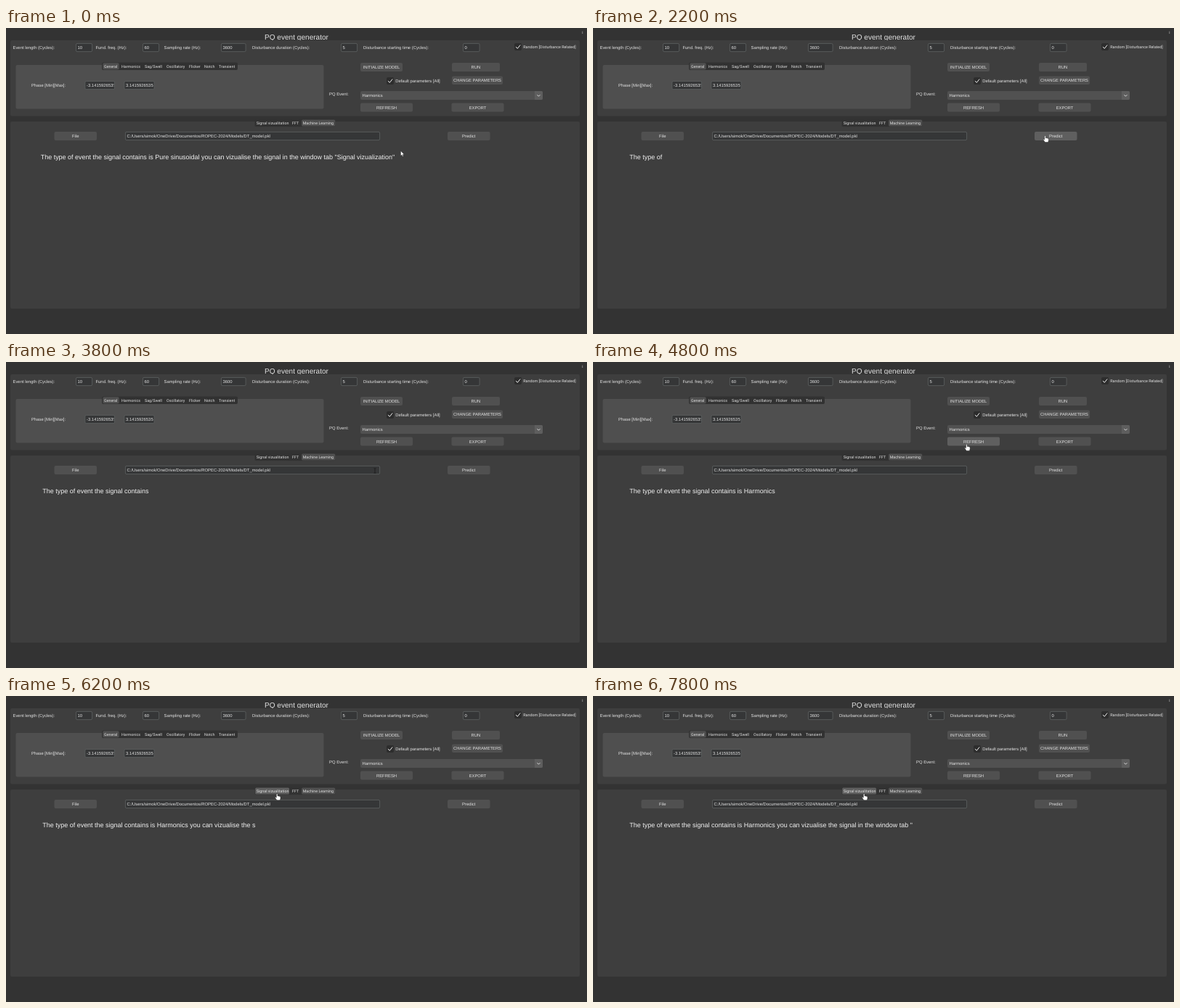
Recreate the animation shown at these times as an HTML page. Size 800 px wide and 422 px high, loop 8 s.

```html
<!DOCTYPE html>
<html lang="en">
<head>
<meta charset="utf-8">
<title>PQ event generator</title>
<style>
  html, body { margin: 0; width: 100%; height: 100%; overflow: hidden; background: #333; }
  svg { display: block; width: 100%; height: 100%; }
  text {
    font-family: "Liberation Sans", Arial, sans-serif;
    fill: #e2e2e2;
    text-rendering: geometricPrecision;
    white-space: pre;
  }
  .tab { font-family: Roboto, sans-serif; }
</style>
</head>
<body>
<svg id="stage" viewBox="0 0 800 422"></svg>
<script>
const NS = 'http://www.w3.org/2000/svg';
const stage = document.getElementById('stage');
const LOOP = 8000, TICK = 200;
const BUTTON = '#505050', HOVER = '#5f5f5f', DARK = '#323232', PANEL = '#3e3e3e';

function add(tag, attrs, parent = stage) {
  const el = document.createElementNS(NS, tag);
  for (const key in attrs) el.setAttribute(key, attrs[key]);
  parent.appendChild(el);
  return el;
}

const box = (x, y, w, h, fill, rx = 2, more = {}) =>
  add('rect', { x, y, width: w, height: h, rx, fill, ...more });

function label(str, x, y, size = 5.9, more = {}, parent = stage) {
  const el = add('text', { x, y, 'font-size': size, ...more }, parent);
  el.textContent = str;
  return el;
}

const hot = [];
function button(str, x, y, w, h, size = 5.9) {
  const rect = box(x, y, w, h, BUTTON);
  label(str, x + w / 2, y + h / 2 + 2.1, size, { 'text-anchor': 'middle' });
  hot.push({ rect, x, y, w, h, rest: BUTTON });
}

function entry(str, x, y, w, h = 12) {
  box(x + .4, y + .4, w - .8, h - .8, '#353637', 1.6, { stroke: '#5f6262', 'stroke-width': .8 });
  const view = add('svg', { x: x + 1.5, y, width: w - 3, height: h });
  label(str, 1, h / 2 + 1.7, 5.9, {}, view);
}

function checkbox(x, y) {
  box(x, y, 10, 10, '#2d2d2d', 2);
  add('path', {
    d: `M${x + 2.3} ${y + 5.2}l2 2.1l3.6-4.6`, fill: 'none', stroke: '#ececec',
    'stroke-width': 1, 'stroke-linecap': 'round'
  });
}

function tabs(x, y, w, items, selected) {
  box(x, y, w, 10.6, DARK);
  for (const [str, left, width] of items) {
    const rest = str === selected ? BUTTON : DARK;
    const rect = box(left - 1.6, y + .8, width + 3.2, 9, rest, 1.5);
    label(str, left, y + 7.1, 5.35, { class: 'tab' });
    hot.push({ rect, x: left - 1.6, y: y + .8, w: width + 3.2, h: 9, rest });
  }
}

// Window
box(0, 0, 800, 422, '#333', 0);
label('PQ event generator', 356, 15.5, 10.08);
label('i', 793.2, 8, 5.5);
box(6, 17, 784, 104.5, PANEL);
box(6, 129, 784, 258, PANEL);

// Signal settings
label('Event length (Cycles):', 9.5, 29.3);
label('Fund. freq. (Hz):', 123.5, 29.3);
label('Sampling rate (Hz):', 217.5, 29.3);
label('Disturbance duration (Cycles):', 339, 29.3);
label('Disturbance starting time (Cycles):', 492, 29.3);
entry('10', 96, 21, 23);
entry('60', 188, 21, 23);
entry('3600', 296, 21, 34.5);
entry('5', 461, 21, 23);
entry('0', 629, 21, 23.5);
checkbox(700, 21);
label('Random [Disturbance Related]', 712.2, 27.7, 5.4, { class: 'tab' });

// Parameter tabs
box(13.5, 51, 424, 60.5, '#4f4f4f');
tabs(132, 47.4, 187, [
  ['General', 135, 19], ['Harmonics', 159, 26], ['Sag/Swell', 191, 24],
  ['Oscillatory', 221, 25], ['Flicker', 252, 16], ['Notch', 273, 15], ['Transient', 293, 23]
], 'General');
label('Phase [Min][Max]:', 35, 81);
entry('-3.141592653589793', 108.5, 73, 41.5);
entry('3.141592653589793', 162.5, 73, 42);

// Actions
button('INITIALIZE MODEL', 488, 48, 58, 12, 5.78);
button('RUN', 614, 48, 66, 12);
checkbox(524, 68);
label('Default parameters [All]', 536.2, 75.2);
button('CHANGE PARAMETERS', 614, 66.5, 70, 11.5, 5.8);
label('PQ Event:', 445, 93.3);
box(488, 87, 251, 12, '#515151');
add('path', { d: 'M728 87h9a2 2 0 0 1 2 2v8a2 2 0 0 1-2 2h-9z', fill: '#5e5e5e' });
add('path', { d: 'M731.4 92.2l2 2l2-2', fill: 'none', stroke: '#e6e6e6', 'stroke-width': .9 });
label('Harmonics', 490.5, 95.2);
button('REFRESH', 488, 103.5, 72, 12);
button('EXPORT', 613.5, 103.5, 72, 12, 5.75);

// Result tabs
tabs(342.5, 125.6, 111, [
  ['Signal vizualitation', 344.8, 43.6], ['FFT', 394, 9], ['Machine Learning', 408.7, 43]
], 'Machine Learning');
button('File', 66.5, 143, 58.5, 12);
const pathBox = { x: 164, y: 143, w: 351, h: 12 };
entry('C:/Users/simok/OneDrive/Documentos/ROPEC-2024/Models/DT_model.pkl', 164, 143, 351);
button('Predict', 608, 143, 58.5, 12);
const message = label('', 0, 181, 8.98, { style: 'fill:#f2f2f2' });

// Pointers, each with its hot spot at 0,0
const pointers = {
  arrow: add('path', {
    d: 'M0 0v6.8l1.6-1.4l1 2.3l1.1-.5l-1-2.2h2.1z',
    fill: '#fff', stroke: '#222', 'stroke-width': .4
  }),
  hand: add('path', {
    d: 'M-.9 .5q.9-1.3 1.7 0v2.6q1-.6 1.4.2q1-.4 1.4.4q1.1-.3 1.2.8v2.2l-.8 2.3h-4.2l-2.3-3.4q-.5-1.3.7-1l.9.8z',
    fill: '#fff', stroke: '#222', 'stroke-width': .5
  }),
  beam: add('path', {
    d: 'M-1.5-3.2h1l.5.4l.5-.4h1M0-2.8v5.6M-1.5 3.2h1l.5-.4l.5.4h1',
    fill: 'none', stroke: '#111', 'stroke-width': .6
  })
};

const sentence = kind => `The type of event the signal contains is ${kind} you can vizualise ` +
  'the signal in the window tab "Signal vizualization"';
const before = sentence('Pure sinusoidal'), after = sentence('Harmonics');

const typing = [[1500, 0], [2200, 11], [3800, 37], [4800, 50], [6200, 74], [7800, 99]];
const route = [
  [0, 543.5, 169.5], [200, 620, 161], [600, 620, 161], [800, 622.6, 148.6], [2600, 622.6, 148.6],
  [3200, 508, 150], [4200, 508, 150], [4600, 514.4, 113.4], [5200, 514.4, 113.4], [5800, 373.2, 134.8]
];

// Linear interpolation of every column after the time
function sample(keys, t) {
  const next = keys.findIndex(k => k[0] > t);
  if (next < 0) return keys[keys.length - 1].slice(1);
  if (next === 0) return keys[0].slice(1);
  const a = keys[next - 1], b = keys[next];
  const p = (t - a[0]) / (b[0] - a[0]);
  return a.slice(1).map((v, i) => v + (b[i + 1] - v) * p);
}

const inside = (r, x, y) => x >= r.x && x <= r.x + r.w && y >= r.y && y <= r.y + r.h;

function draw(time) {
  const t = Math.floor((time % LOOP) / TICK) * TICK;

  const fresh = t >= 1500;
  message.textContent = fresh ? after.slice(0, Math.round(sample(typing, t)[0])) : before;
  message.setAttribute('x', fresh ? 50.3 : 47.7);

  const [x, y] = sample(route, t);
  let shape = inside(pathBox, x, y) ? 'beam' : 'arrow';
  for (const spot of hot) {
    const over = inside(spot, x, y);
    if (over) shape = 'hand';
    spot.rect.setAttribute('fill', over ? HOVER : spot.rest);
  }
  for (const name in pointers) {
    pointers[name].setAttribute('visibility', name === shape ? 'visible' : 'hidden');
    pointers[name].setAttribute('transform', `translate(${x} ${y})`);
  }
}

const start = performance.now();
function tick() {
  draw(performance.now() - start);
  requestAnimationFrame(tick);
}
tick();
</script>
</body>
</html>
```
